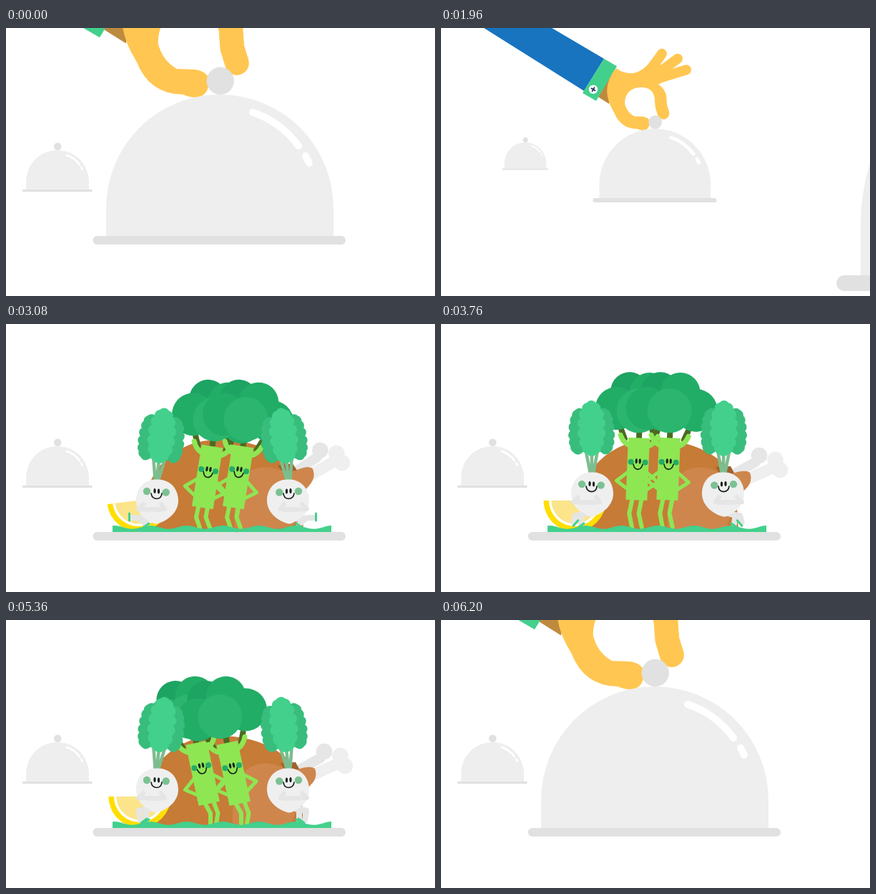
An HTML page for the animation above (6440 ms loop, 600x375 px).

```html
<!DOCTYPE html>
<html lang="en">
<head>
<meta charset="utf-8">
<title>Dinner is served</title>
<style>
html, body { margin: 0; width: 100%; height: 100%; overflow: hidden; background: #fff; }
svg { display: block; width: 600px; height: 375px; overflow: hidden; }
.line { fill: none; stroke-linecap: round; stroke-linejoin: round; }
</style>
</head>
<body>
<svg id="stage" viewBox="0 0 600 375"></svg>
<script>
const LOOP = 6440, STEP = 40, BEAT = 480, SWAY = 960, DANCE = 3080;

// Drawing helpers
const circle = (x, y, r, fill) => `<circle cx="${x}" cy="${y}" r="${r}" fill="${fill}"/>`;
const oval = (x, y, rx, ry, fill) => `<ellipse cx="${x}" cy="${y}" rx="${rx}" ry="${ry}" fill="${fill}"/>`;
const shape = (d, fill) => `<path d="${d}" fill="${fill}"/>`;
const line = (d, color, width, cls = '') =>
  `<path class="line ${cls}" d="${d}" stroke="${color}" stroke-width="${width}"/>`;
const group = (cls, inner, transform = '') => `<g class="${cls}" transform="${transform}">${inner}</g>`;

const SKIN = '#ffc651', MINT = '#43d08c', LIME = '#8ee653', LEAF = '#22ad66';
const LID = '#eeeeee', RIM = '#e0e1e0', LIMB = '#e5e5e5', INK = '#15201a';

const lid = () =>
  circle(299.7, 74, 19.2, RIM) +
  shape('M140 291V252A159 159 0 0 1 458 252V291Z', LID) +
  line('M345 118Q384 131 409 165M419 179L424 189', '#fff', 10);

const rim = () => `<rect x="121.5" y="291" width="353.5" height="12" rx="6" fill="${RIM}"/>`;

const hand = () => group('hand',
  shape('M-417 -300L60 0L200 88L228 43L155 0L-354 -300Z', '#1874bf') +
  shape('M238 64L219 96L235 106L240 80Z', '#be8a3f') +
  shape('M228 43L246 53.5L217 102L198 91Z', MINT) +
  circle(213, 86, 6.2, '#fff') +
  line('M210.5 84.5L215.5 87.5M214.5 83.5L211.5 88.5', '#1b2a5c', 1.7) +
  shape('M245 56Q256 65 270 63Q284 60 295 44L314 56L325 71Q308 76 304 79Q313 84 315 96' +
    'L298.5 97Q296 83 280 83Q257 84 257 106Q260 118 270 123.5L283 124Q293 126 292 134' +
    'Q290 143 283 143Q278 143 274 141Q251 141 242 118Q221 85 245 56Z', SKIN) +
  line('M294 57L309 36M300 66L331 43M302 71L343 58.5', SKIN, 14) +
  line('M306.8 95L307.8 109L311 119.5', SKIN, 16.6));

function lemon() {
  const half = (r, fill) => shape(`M${187 - r} 247A${r} ${r} 0 0 0 ${187 + r} 247Z`, fill);
  return group('lemon', half(43.5, '#ffde00') + half(36, '#fff') + half(32.5, '#fbe48a'));
}

const chicken = () =>
  shape('M188 288Q191 222 221 192Q253 161 300 162Q372 163 411 212L416 288Z', '#c67b37') +
  group('thigh',
    line('M402 214L440 193', '#e6e6e6', 14) + circle(445, 184, 11.3, '#e6e6e6') +
    shape('M384 200L405 199L412 212L395 218Z', '#a0622d') +
    line('M424 219L464 201', '#efefef', 16) +
    circle(467.5, 190, 11.3, '#efefef') + circle(474, 204, 11.3, '#efefef') +
    shape('M317 288Q315 240 332 214Q348 196 375 202Q394 211 408 209Q426 203 432 208' +
      'Q437 221 425 232Q412 242 407 262L398 288Z', '#ce864c'));

// Leaf with a scalloped edge
function leaf(cx, cy, rx, ry, r, fill) {
  let out = oval(cx, cy, rx + 2, ry + 2, fill);
  for (let i = 0; i < 14; i++) {
    const a = i / 14 * 2 * Math.PI - Math.PI / 2;
    out += circle(cx + rx * Math.cos(a), cy + ry * Math.sin(a), r, fill);
  }
  return out;
}

const turnip = () =>
  line('', LIMB, 8, 'legA') + line('', LIMB, 8, 'legB') +
  line('', MINT, 3, 'shoeA') + line('', MINT, 3, 'shoeB') +
  group('bulb',
    group('leaves',
      line('M209 220L203 188M211 220L211 186M213 220L219 188', '#7cbd8e', 4.5) +
      group('', leaf(193, 160, 7, 25, 7.5, '#38bd7c'), 'rotate(3 193 160)') +
      group('', leaf(229, 160, 7, 25, 7.5, '#38bd7c'), 'rotate(-3 229 160)') +
      leaf(211, 156, 12, 31, 8, MINT)) +
    shape('M211 217.5C230 217 241 231 241 247C241 262 229 274 213 279Q207 281 202 276' +
      'C189 271 182 260 182 247C182 231 193 217 211 217.5Z', '#efefef') +
    line('M192 252L185 259L217 260M217 252L222 259L196 260', LIMB, 6) +
    circle(197, 234, 5.2, '#7cc192') + circle(223.7, 235.5, 5.2, '#7cc192') +
    oval(208, 233.5, 1.6, 3.5, INK) + oval(213.5, 234, 1.6, 3.5, INK) +
    line('M203 237Q204 244.5 211 244.5Q217.5 244 218 237', INK, 1.7));

const stalk = () =>
  line('', LIME, 6, 'stepA') + line('', LIME, 6, 'stepB') + line('', '#1f9e5a', 3, 'heel') +
  group('trunk',
    line('M-20 4L-25 -8M20 4L25 -8M0 4V-8', '#4a6b22', 8) +
    shape('M-15 2H15V89H-15Z', LIME) +
    line('M-13 50L-29 63L-12 75M13 50L29 63L12 75', LIME, 5) +
    circle(-10, 36, 4, LEAF) + circle(10, 36, 4, LEAF) +
    oval(-2.4, 34.5, 1.6, 3.6, INK) + oval(2.6, 34.5, 1.6, 3.6, INK) +
    line('M-6.5 39Q-5 46 0 46Q5 46 6.5 39', INK, 1.6));

const crown = () => group('trunk',
  circle(-16, -63, 26.5, '#1da362') + circle(12, -62, 28, LEAF) +
  circle(-33, -38, 30, LEAF) + circle(35, -38, 30, LEAF) + circle(-2, -36, 31, '#2bb56e') +
  line('M-9 14Q-21 12 -26 -1M9 14Q21 12 26 -1', LIME, 7));

function lettuce() {
  let d = 'M149 291';
  for (let x = 149; x <= 455; x += 3) {
    d += `L${x} ${(284.4 - 2.3 * Math.cos((x - 202) / 50.7 * 2 * Math.PI)).toFixed(1)}`;
  }
  return shape(d + 'V291Z', MINT);
}

const PAIR = 'translate(43 0)', MIRROR = 'translate(606 0) scale(-1 1)';
const food = () => group('food',
  chicken() + lemon() +
  group('', stalk()) + group('', stalk(), PAIR) +
  group('', crown()) + group('', crown(), PAIR) +
  group('', turnip()) + group('', turnip(), MIRROR) + lettuce());

const cloche = (id, inside = '', arm = '') =>
  `<g id="${id}">${rim()}${inside}${group('cover', arm + lid())}</g>`;

const stage = document.getElementById('stage');
stage.innerHTML = cloche('far') + cloche('next', food(), hand()) + cloche('near', '', hand());

// Motion helpers
const sine = p => (1 - Math.cos(Math.PI * p)) / 2;
const linear = p => p;
const outCubic = p => 1 - (1 - p) ** 3;
const inQuad = p => p * p;
const clamp = p => Math.max(0, Math.min(1, p));
const mix = (a, b, p) => a + (b - a) * p;
const span = (t, a, b, ease = sine) => ease(clamp((t - a) / (b - a)));

function track(t, keys, ease = sine) {
  let i = 0;
  while (i < keys.length - 2 && t >= keys[i + 1][0]) i++;
  const [a, b] = [keys[i], keys[i + 1]];
  const p = span(t, a[0], b[0], ease);
  return a.slice(1).map((v, k) => mix(v, b[k + 1], p));
}

const each = (sel, attrs) => stage.querySelectorAll(sel).forEach(el => {
  for (const key in attrs) el.setAttribute(key, attrs[key]);
});
const show = (sel, on) => each(sel, { display: on ? 'inline' : 'none' });

// time, x, y, scale
const PATHS = {
  near: [[560, 299, 297, 1], [1800, 878, 357, 1.83], [2000, 878, 357, 1.83], [2760, 1500, 420, 3]],
  next: [[560, 72, 227.5, .277], [1800, 299.3, 241, .49], [2000, 299.3, 241, .49], [2760, 299, 297, 1]],
  far: [[560, -20, 200, .1], [1800, 118, 197.5, .184], [2000, 118, 197.5, .184], [2760, 72, 227.5, .277]]
};

// phase, hip x, lift, tilt, foot A, foot B, heel lift
const GROOVE = [
  [0, -6, 0, 9, -10, 4, 0], [.12, 0, -13, 5, -7, 7, 0], [.25, 8, -12, -6, 3, 13, 0],
  [.375, 3, 0, -12, 5, 13, 0], [.458, -14, 1, -9.5, -9, -6, 19], [.6, -15, 0, -5, -18, -6, 5],
  [.75, -6, -13, 4, -13, 1, 0], [.88, -4, -2, 10, -11, 3, 0], [1, -6, 0, 9, -10, 4, 0]
];
// phase, height, kick
const SQUAT = [
  [0, 0, 1], [.12, 0, 1.6], [.32, -6, .5], [.5, -13, 0], [.75, -10, 0], [.9, .6, 1], [1, 0, 1]
];

function placeCloches(t) {
  for (const id in PATHS) {
    let [x, y, s] = track(t, PATHS[id]);
    if (id !== 'near') {
      const p = span(t, 560, 1800);
      x += (PATHS[id][1][1] - PATHS[id][0][1]) * .25 * p * (1 - p);
    }
    each('#' + id, { transform: `translate(${x} ${y}) scale(${s}) translate(-299 -297)` });
  }
}

function placeHand(t) {
  const away = t < 1240 ? span(t, 560, 960) : 1 - span(t, 1560, 1900, outCubic);
  each('.hand', {
    transform: `translate(299 297) scale(2.041) translate(${-299.3 - 320 * away} ${-241 - 150 * away})`
  });
  show('#near .hand', t < 1240);
  show('#next .hand', t >= 1240);
  const up = t < 4000 ? span(t, 2320, 2640, inQuad) : 1 - span(t, 6000, 6200, outCubic);
  each('#next .cover', { transform: `translate(0 ${-310 * up})` });
  show('#next .cover', up < 1);
}

function danceTurnips(t) {
  const beat = ((t - DANCE) / BEAT % 1 + 1) % 1, sway = (t - DANCE) / SWAY;
  const [dy, kick] = track(beat, SQUAT);
  const tilt = 4.5 + 5 * Math.cos((sway - .19) * 2 * Math.PI);
  each('.bulb', { transform: `translate(0 ${dy})` });
  each('.leaves', { transform: `rotate(${tilt} 211 217)` });
  const footX = mix(188, 176, kick), footY = mix(280, 271, kick);
  const kneeX = mix(186, 194, kick), kneeY = mix(267, 272, kick);
  each('.legA', { d: `M${mix(198, 213, kick)} ${mix(264, 273, kick)}L${kneeX} ${kneeY}L${footX} ${footY}` });
  const low = clamp(kick);
  each('.legB', { d: `M204 ${mix(263, 272, low)}L${mix(196, 188, low)} ${mix(266, 273, low)}L196 280` });
  const sx = mix(193, 172.5, kick), sy = mix(281, 270, kick), a = mix(-.65, -1.57, low);
  const dx = 5 * Math.cos(a), dv = 5 * Math.sin(a);
  each('.shoeA', { d: `M${sx - dx} ${sy - dv}L${sx + dx} ${sy + dv}` });
  each('.shoeB', { d: 'M193 284L200 279' });
}

function danceStalks(t) {
  const phase = ((t - DANCE) / SWAY % 1 + 1) % 1;
  const [hip, lift, tilt, footA, footB, heel] = track(phase, GROOVE);
  const hx = 281 + hip, hy = 256 + lift;
  each('.trunk', { transform: `translate(${hx} ${hy}) rotate(${tilt}) translate(0 -88)` });
  const leg = (from, foot, raise) => {
    const x = hx + from, fx = 281 + foot, fy = 285 - raise;
    const bend = tilt > 0 ? -4 : 4;
    return `M${x} ${hy}L${(x + fx) / 2 + bend} ${(hy + fy) / 2 + raise * .2}L${fx} ${fy}`;
  };
  each('.stepA', { d: leg(-6, footA, 0) });
  each('.stepB', { d: leg(7, footB, heel) });
  const x = 281 + footB, y = 285 - heel;
  each('.heel', { d: `M${x - 5} ${y + 1.5}L${x + 6} ${y - 1.5}` });
  show('.heel', heel > 6);
}

function placeFood(t) {
  show('.food', t >= 2320 && t < 6200);
  const grow = t < 4000
    ? track(t, [[2320, .55], [2640, 1.04], [2800, 1]])[0]
    : mix(1, .85, span(t, 6040, 6160, linear));
  each('.food', { transform: `translate(300 290) scale(${grow}) translate(-300 -290)` });
  const [wobble] = track(t, [[2640, 0], [3080, 1], [3480, -.25], [3800, 0]]);
  each('.lemon', { transform: `translate(${-2 * wobble} 0) rotate(${-7 * wobble} 187 247)` });
  each('.thigh', { transform: `rotate(${-5 * wobble} 360 245)` });
}

function draw(time) {
  const t = Math.floor(time % LOOP / STEP) * STEP;
  placeCloches(t);
  placeHand(t);
  placeFood(t);
  danceTurnips(t);
  danceStalks(t);
}

const start = performance.now();
function tick() {
  draw(performance.now() - start);
  requestAnimationFrame(tick);
}
tick();
</script>
</body>
</html>
```
